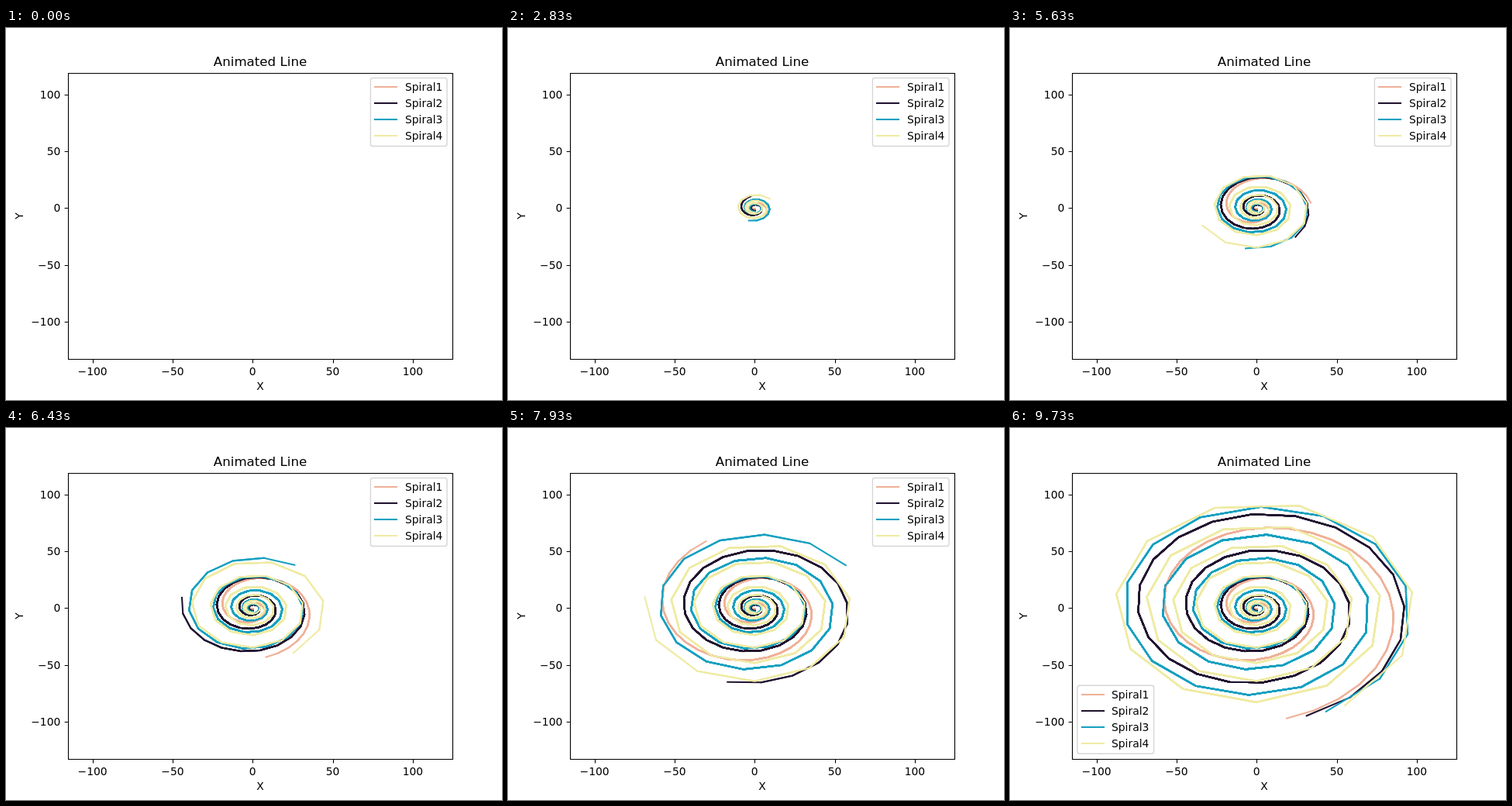
Write an HTML page with a canvas that moves like this. It is 640 px wide and 480 px high and loops after 9830 ms.

```html
<!DOCTYPE html>
<html lang="en">
<head>
<meta charset="utf-8">
<title>Animated Line</title>
<style>
  html, body { margin: 0; width: 100%; height: 100%; overflow: hidden; background: #fff; }
  canvas, svg { position: absolute; left: 0; top: 0; }
  text { font: 13.889px "DejaVu Sans", sans-serif; fill: #000; }
  .title { font-size: 16.667px; }
  .middle { text-anchor: middle; }
  .end { text-anchor: end; }
  .axis { fill: none; stroke: #000; stroke-width: 1.11; }
</style>
</head>
<body>
<canvas width="640" height="480"></canvas>
<svg width="640" height="480" viewBox="0 0 640 480">
  <g id="axes"></g>
  <g id="legend"></g>
</svg>
<script>
const LOOP = 9830, FIRST_HOLD = 30, STEP = 100, SAMPLES = 100;
const LEGEND_MOVE = 94; // from this step a spiral would run under the legend
const LINE_WIDTH = 2.083;

const spirals = [
  { turns: 3, color: '#efb199' },
  { turns: 5, color: '#21132f' },
  { turns: 7, color: '#16a0c0' },
  { turns: 9, color: '#efeba5' }
];

const toX = x => 318.25 + x * 2.0667;
const toY = y => 232.41 - y * 1.46295;

spirals.forEach((spiral, k) => {
  spiral.points = Array.from({ length: SAMPLES }, (_, i) => {
    const u = i / (SAMPLES - 1);
    const angle = spiral.turns * Math.PI * (2 * u - 1);
    const radius = 100 * u * u + k + 1;
    return [toX(radius * Math.sin(angle)), toY(radius * Math.cos(angle))];
  });
});

const label = (x, y, text, attrs = '') => `<text x="${x}" y="${y}" ${attrs}>${text}</text>`;

function axesMarkup() {
  let ticks = '', labels = '';
  for (let v = -100; v <= 100; v += 50) {
    const name = String(v).replace('-', '\u2212');
    const x = toX(v), y = toY(v);
    ticks += `M${Math.round(x) + 0.5} 427.5v4.9M80.5 ${Math.round(y) + 0.5}h-4.9`;
    labels += label(x, 448, name, 'class="middle"');
    labels += label(70.3, Math.round(y + 5), name, 'class="end"');
  }
  return `<path class="axis" d="M80.5 58.5H576.5V427.5H80.5Z${ticks}"/>` + labels +
    label(328, 49, 'Animated Line', 'class="title middle"') +
    label(328, 467, 'X', 'class="middle"') +
    label(0, 0, 'Y', 'class="middle" transform="translate(22 242.4) rotate(-90)"');
}

function legendMarkup(left, top) {
  const frame = `<rect x="${left}" y="${top}" width="98.66" height="87.95" rx="2.78"
    fill="#fff" fill-opacity=".8" stroke="#ccc" stroke-opacity=".8" stroke-width="1.39"/>`;
  return frame + spirals.map(({ color }, k) => {
    const x = Math.round(left + 5.56), y = Math.round(top + 11.4 + 20.95 * k);
    return `<path d="M${x} ${y}h28" stroke="${color}" stroke-width="${LINE_WIDTH}" stroke-linecap="square"/>` +
      label(Math.round(left + 44.4), y + 5, 'Spiral' + (k + 1));
  }).join('');
}

const ctx = document.querySelector('canvas').getContext('2d');
const legend = document.getElementById('legend');
document.getElementById('axes').innerHTML = axesMarkup();
ctx.lineWidth = LINE_WIDTH;
ctx.lineJoin = 'round';
ctx.lineCap = 'square';

// Each step strokes the whole curves again, so older parts look heavier than the tips.
function strokeSpirals(last) {
  for (const { points, color } of spirals) {
    ctx.strokeStyle = color;
    ctx.beginPath();
    for (let i = 0; i <= last; i++) ctx.lineTo(...points[i]);
    ctx.stroke();
  }
}

let drawn = 0, legendMoved = null;

function show(step) {
  if (step < drawn) {
    ctx.clearRect(0, 0, 640, 480);
    drawn = 0;
  }
  while (drawn < step) strokeSpirals(++drawn);

  const moved = step >= LEGEND_MOVE;
  if (moved !== legendMoved) {
    legend.innerHTML = moved ? legendMarkup(86.94, 332.31) : legendMarkup(470.4, 64.54);
    legendMoved = moved;
  }
}

function tick() {
  const t = performance.now() % LOOP;
  show(t < FIRST_HOLD ? 0 : Math.floor((t - FIRST_HOLD) / STEP) + 1);
  requestAnimationFrame(tick);
}
tick();
</script>
</body>
</html>
```
